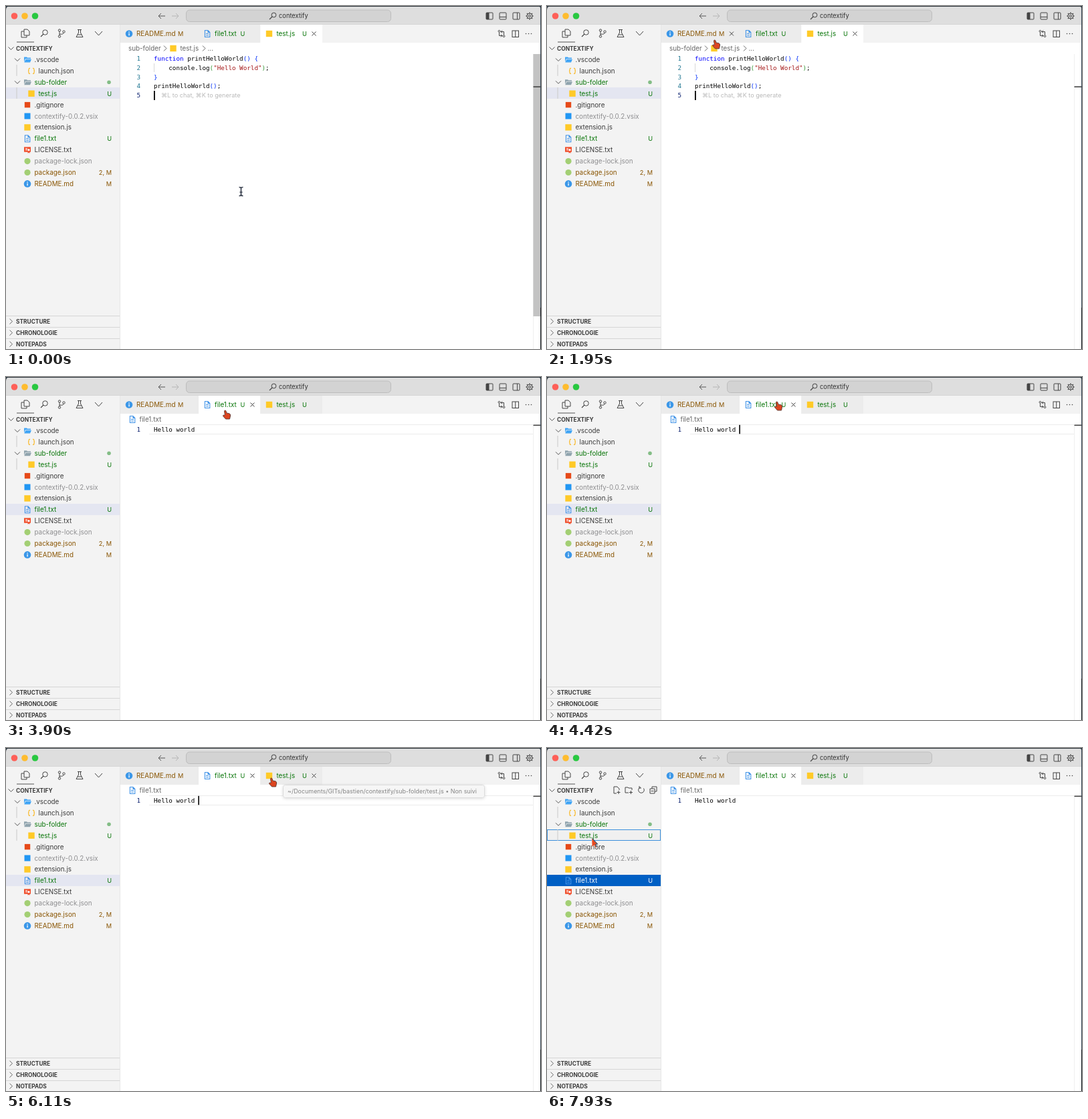
Write an HTML page that moves like this. It is 800x514 px and loops after 8 s.

```html
<!DOCTYPE html>
<html lang="fr">
<head>
<meta charset="utf-8">
<title>contextify</title>
<style>
html, body { margin: 0; width: 100%; height: 100%; overflow: hidden; background: #fff; }
svg { display: block; width: 800px; height: 514px; }
text { white-space: pre; font-family: Inter, "Liberation Sans", "DejaVu Sans", sans-serif; }
.mono { font-family: "DejaVu Sans Mono", "Liberation Mono", monospace; }
</style>
</head>
<body>
<svg viewBox="0 0 800 514">
  <defs>
    <linearGradient id="menuFill" gradientUnits="userSpaceOnUse" x1="0" y1="484" x2="0" y2="514">
      <stop stop-color="#dddddd"/><stop offset=".5" stop-color="#d9dfe1"/><stop offset="1" stop-color="#c5dde6"/>
    </linearGradient>
    <filter id="shadow" x="-10%" y="-20%" width="120%" height="150%">
      <feDropShadow dx="0" dy="2" stdDeviation="3" flood-opacity=".28"/>
    </filter>
    <filter id="softShadow" x="-5%" y="-40%" width="110%" height="200%">
      <feDropShadow dx="0" dy="1" stdDeviation="2" flood-opacity=".14"/>
    </filter>
  </defs>
  <g id="base"></g>
  <g id="live"></g>
  <g id="pointer"></g>
</svg>
<script>
const LOOP = 8000, ROW = 16.9, LINE = 13.85;
const GREEN = '#087508', BROWN = '#895503', GRAY = '#8e8e90', INK = '#3b3b3b';

// Drawing helpers; text is placed by its vertical middle.
const text = (x, y, s, fill = INK, size = 9.85, extra = '') =>
  `<text x="${x}" y="${y + size * .36}" fill="${fill}" font-size="${size}" ${extra}>${s}</text>`;
const rect = (x, y, w, h, fill, extra = '') =>
  `<rect x="${x}" y="${y}" width="${w}" height="${h}" fill="${fill}" ${extra}/>`;
const circle = (x, y, r, fill, extra = '') =>
  `<circle cx="${x}" cy="${y}" r="${r}" fill="${fill}" ${extra}/>`;
const stroke = (x, y, d, color = '#444', width = 1) =>
  `<path transform="translate(${x} ${y})" d="${d}" fill="none" stroke="${color}" stroke-width="${width}"/>`;
const shape = (x, y, d, fill, extra = '') =>
  `<path transform="translate(${x} ${y})" d="${d}" fill="${fill}" ${extra}/>`;
const chevron = (x, y, color = '#666', width = 1) => stroke(x, y, 'M-2 -4L2 0L-2 4', color, width);
const chevronDown = (x, y) => stroke(x, y, 'M-4 -2L0 2L4 -2', '#555');
const cross = (x, y) => stroke(x, y, 'M-3 -3L3 3M3 -3L-3 3');
const search = (x, y, k = 1) => stroke(x, y, 'M-1 1L-5 5', '#444', 1.1) +
  circle(x + 1.5, y - 1.5, 3.4 * k, 'none', 'stroke="#444"');

const folder = color => (x, y) =>
  shape(x, y, 'M-5 -4H-1L0 -3H5V-1.5H-3L-5 3Z M-2.5 -.7H6L4 4H-4.8Z', color);
const icons = {
  code: folder('#42a5f5'),
  dir: folder('#90a4ae'),
  json: (x, y) => stroke(x, y, 'M-2 -4H-3Q-4 -4 -4 -2Q-4 0 -5 0Q-4 0 -4 2Q-4 4 -3 4H-2M2 -4H3Q4 -4 4 -2Q4 0 5 0Q4 0 4 2Q4 4 3 4H2', '#f9b825', 1.2),
  js: (x, y) => rect(x - 4.7, y - 4.7, 9.4, 9.4, '#ffca28'),
  git: (x, y) => rect(x - 4.2, y - 4.2, 8.4, 8.4, '#e64a19'),
  vsix: (x, y) => rect(x - 4.5, y - 4.5, 9, 9, '#2196f3'),
  node: (x, y) => circle(x, y, 4.6, '#a3cf74'),
  txt: (x, y) => stroke(x, y, 'M-3.6 -5H1L3.8 -2V5H-3.6ZM1 -5V-2H3.8M-2 0H2M-2 2.5H2', '#4294e8', 1.1),
  license: (x, y) => shape(x, y, 'M-5 -4.5H5V3H3.5V5L2 4L.5 5V3H-5Z', '#f0502e') +
    stroke(x, y, 'M-3 -2H0M-3 0H0', '#fff') + circle(x + 2, y, 1.6, '#fff'),
  info: (x, y) => circle(x, y, 5.3, '#3b97e8') + rect(x - .6, y - .8, 1.3, 3.7, '#fff') + circle(x, y - 2.4, .8, '#fff')
};

const files = [
  ['code', '.vscode', INK, '', 0, true],
  ['json', 'launch.json', INK, '', 1],
  ['dir', 'sub-folder', GREEN, '', 0, true],
  ['js', 'test.js', GREEN, 'U', 1],
  ['git', '.gitignore', INK, ''],
  ['vsix', 'contextify-0.0.2.vsix', GRAY, ''],
  ['js', 'extension.js', INK, ''],
  ['txt', 'file1.txt', GREEN, 'U'],
  ['license', 'LICENSE.txt', INK, ''],
  ['node', 'package-lock.json', GRAY, ''],
  ['node', 'package.json', BROWN, '2, M'],
  ['info', 'README.md', BROWN, 'M']
];
const rowY = i => 80.5 + ROW * i;
const TEST = 3, FILE1 = 7;

function titleBar() {
  const panel = (x, part) => rect(x - 5, 10, 10, 10, 'none', 'stroke="#444" rx="1"') + part;
  const gear = stroke(783, 15, 'M0 -5.6V5.6M-5.6 0H5.6M-4 -4L4 4M4 -4L-4 4', '#555', 1.6);
  return rect(0, 0, 800, 28, '#dedede') + rect(0, 27.5, 800, .7, '#d0d0d0') +
    circle(12.5, 15, 4.8, '#fe5f57') + circle(28, 15, 4.8, '#febc2e') + circle(43.5, 15, 4.8, '#28c840') +
    stroke(233, 15, 'M5 0H-4.5M-1 -4L-5 0L-1 4', '#555') + stroke(253, 15, 'M-5 0H4.5M1 -4L5 0L1 4', '#b5b5b5') +
    rect(269.5, 6, 306, 17.5, '#d3d3d3', 'rx="5" stroke="#bdbdbd"') +
    search(399, 15) + text(408, 15, 'contextify', '#333', 9.3) +
    panel(723, rect(718, 10, 4.5, 10, '#444')) + panel(743, rect(738, 16, 10, 1, '#444')) +
    panel(763, rect(764, 10, 1, 10, '#444')) +
    gear + circle(783, 15, 4, '#dedede', 'stroke="#444"') + circle(783, 15, 1.6, 'none', 'stroke="#444"');
}

function sideBar() {
  let s = rect(0, 28, 170.5, 486, '#f3f3f3') + rect(170, 28, 1, 486, '#e7e7e7');
  s += stroke(29, 41, 'M-2 -6H3L6 -3V3H-2ZM-2 -3H-6V6H2V3') + search(57, 41, 1.1) +
    stroke(83, 41, 'M-3 -3V3M-3 1Q3 2 3 -1') + circle(80, 36.5, 1.7, 'none', 'stroke="#444"') +
    circle(80, 45.5, 1.7, 'none', 'stroke="#444"') + circle(86.5, 38.5, 1.7, 'none', 'stroke="#444"') +
    stroke(110, 41, 'M-3 -5.5H3M-1.5 -5.5V-1L-5 5.5H5L1.5 -1V-5.5M-3 2H3') +
    stroke(138.5, 41, 'M-5.5 -3L0 3L5.5 -3') + rect(16, 53.5, 26, 1, '#555');
  s += chevronDown(7.5, 63.5) + text(15, 63.5, 'CONTEXTIFY', INK, 8.4, 'font-weight="700"');
  ['STRUCTURE', 'CHRONOLOGIE', 'NOTEPADS'].forEach((name, i) => {
    const y = 472.7 + 17 * i;
    s += rect(0, Math.floor(y - 8.7), 170, 1, '#d6d6d6') + chevron(7.5, y) + text(15, y, name, INK, 8.4, 'font-weight="700"');
  });
  return s;
}

function tree(st) {
  let s = '';
  files.forEach(([icon, name, color, badge, depth = 0, open], i) => {
    const y = rowY(i), top = Math.floor(y - ROW / 2);
    const selected = i === (st.active === 'test' ? TEST : FILE1);
    const strong = selected && st.treeFocus;
    if (selected) s += rect(0, top, 170, 17, strong ? '#005fc4' : '#e4e6f1');
    if ((i === FILE1 && st.menu) || (i === TEST && st.treeFocus))
      s += rect(.5, top + .5, 169, 16, i === TEST ? '#f0f0f0' : 'none', 'stroke="#3b8fdc"');
    if (depth) s += rect(15.5, top, 1, ROW, '#c9c9c9');
    if (open) s += chevronDown(17, y);
    const ink = strong ? '#fff' : color;
    s += icons[icon](32 + depth * 6, y) + text(42.5 + depth * 6, y, name, ink) +
      text(158, y, badge, ink, 9.2, 'text-anchor="end"');
  });
  s += circle(154, rowY(2), 2.8, '#83bd86');
  if (st.sideHover) {
    s += stroke(104, 63, 'M0 5H-4V-5H1L4 -2V0M3 1V6M.5 3.5H5.5') +
      stroke(122, 63, 'M0 4H-5V-4H-1L0 -3H5V0M3.5 1V6M1 3.5H6') +
      stroke(141, 63, 'M3.5 -2.5A4.3 4.3 0 1 1 -1 -4.2M-3 -6V-3H0') +
      stroke(159, 63, 'M-2 -2V-5H5V2H2M-5 -2H2V5H-5ZM-3.5 1.5H.5');
  }
  return s;
}

function tabs(st) {
  const tab = (id, x, w, icon, name, color, mark, markX, closeX) => {
    const active = st.active === id;
    return rect(x, 28, w, 27, active ? '#fff' : '#ececec') +
      icons[icon](x + 13, 41.5) + text(x + 24, 41.5, name, color) +
      text(markX, 41.5, mark, color, 9.2) + (active || st.hover === id ? cross(closeX, 41.5) : '');
  };
  return rect(171, 28, 629, 27, '#f3f3f3') +
    tab('readme', 171, 117, 'info', 'README.md', BROWN, 'M', 257, 276) +
    tab('file1', 288, 92, 'txt', 'file1.txt', GREEN, 'U', 350.5, 368.5) +
    tab('test', 380.5, 92.5, 'js', 'test.js', GREEN, 'U', 443, 460.5) +
    stroke(741, 41.5, 'M-3.5 -2V3H1M-1 1L1 3L-1 5M3.5 2V-3H-1M1 -5L-1 -3L1 -1') +
    circle(737.5, 37.8, 1.4, 'none', 'stroke="#444"') + circle(744.5, 45.2, 1.4, 'none', 'stroke="#444"') +
    rect(757, 37, 9.5, 9.5, 'none', 'stroke="#444"') + rect(761.2, 37, 1, 9.5, '#444') +
    [777.5, 781.5, 785.5].map(x => circle(x, 41.5, .8, '#444')).join('');
}

const tint = (s, color) => `<tspan fill="${color}">${s}</tspan>`;
const blue = s => tint(s, '#0431fa');
const code = [
  tint('function', '#0000ff') + ' printHelloWorld' + blue('()') + ' ' + blue('{'),
  '    console.log' + tint('(', '#319331') + tint('"Hello World"', '#a31515') + tint(')', '#319331') + ';',
  blue('}'),
  'printHelloWorld' + blue('()') + ';',
  ''
];

function editor(st) {
  const isTest = st.active === 'test';
  const lines = isTest ? code : ['Hello world'];
  let s = rect(171, 55, 629, 459, '#fff');
  s += isTest
    ? text(183, 63.5, 'sub-folder', '#666') + chevron(238, 63.5) + icons.js(250, 63.5) +
      text(260.5, 63.5, 'test.js', '#666') + chevron(296, 63.5) + text(301.5, 63.5, '...', '#666')
    : icons.txt(189, 63.5) + text(199.5, 63.5, 'file1.txt', '#666') + rect(214, 71, 574, 1, '#ececec');
  if (!isTest && st.focus) s += rect(214, 85, 574, 1, '#ececec');
  lines.forEach((line, i) => {
    const y = 78.5 + LINE * i, last = i === lines.length - 1;
    s += text(201, y, i + 1, last ? '#0b216f' : '#237893', 9.25, 'class="mono" text-anchor="end"') +
      text(221, y, line, '#000', 9.25, 'class="mono"');
  });
  if (isTest) s += rect(221, 86, 1, 13, '#d8d8d8') + text(232, 134, '⌘L to chat, ⌘K to generate', '#b9b9b9', 9.1);
  if (st.caret) s += isTest ? rect(221, 127, 1.8, 14, '#000') : rect(287.3, 71.8, 1.6, 13.5, '#000');
  s += rect(788, 72, 1, 442, '#efefef') + rect(788.5, 72, 11, 393, '#9e9e9e', `opacity="${st.thumb}"`) +
    rect(788.5, isTest ? 120.3 : 71.5, 11.5, 1.6, '#444');
  return s;
}

// "|" precedes a shortcut, ">" ends a submenu entry, "~" starts a disabled one.
const menuGroups = [
  ['Add to Context', 'Reset Context'],
  ['Fermer|⌘ W', 'Fermer les autres|⌥⌘ T', 'Fermer à droite', 'Fermer la version sauvegardée [⌘R U]', 'Tout fermer [⌘R W]'],
  ['Copier le chemin|⌥⌘ C', 'Copier le chemin d’accès relatif|⌥⇧⌘ C', 'Copy Remote File URL', 'Copy Remote File URL From...'],
  ['Rouvrir l’éditeur avec...'],
  ['Partager>'],
  ['Open Changes>', 'Open on Remote (Web)>'],
  ['File History>'],
  ['Afficher dans le Tildor|⌥⌘ R', 'Afficher en mode Explorateur'],
  ['~Garder ouvert [⌘R ⏎]', 'Épingler [⌘R ⇧⏎]'],
  ['Filter Line By...'],
  ['Fractionner en haut [⌘R ⌃⇧⌥⌘:]', 'Fractionner en bas']
];
const notepad = (x, y) => rect(x - 5, y - 5, 10, 10, '#f5f0dc', 'stroke="#77715f" stroke-width=".8"') +
  rect(x - 5, y - 5, 10, 2, '#8a8577') + stroke(x, y, 'M-3 0H3M-3 2.5H3', '#c9bf9d', .7);

function menu({ x, y, lit }) {
  let s = rect(x, y - 13.5, 270, 560, 'url(#menuFill)', 'rx="5" stroke="#bcbcbc" stroke-width=".7" filter="url(#shadow)"');
  if (lit) s += rect(x + 5, y - 8.3, 260, 16.9, '#4a9cf6', 'rx="3"');
  s += shape(x + 91, y, 'M-4 -5H1.5L4 -2.5V5H-4Z', '#f4f4f4', 'stroke="#888" stroke-width=".7"') +
    stroke(x + 106, y, 'M0 -4.5V4.5M-4.5 0H4.5', '#333', 2.6) + notepad(x + 120.5, y) +
    stroke(x + 87, y + ROW, 'M5.5 -5L-1 1', '#8b5a2b', 1.5) +
    shape(x + 87, y + ROW, 'M-2 -1L1.5 2.5L-2 5L-5.5 3Z', '#d9b33c') + notepad(x + 101.5, y + ROW);
  let row = y;
  menuGroups.forEach((group, g) => {
    if (g) {
      s += rect(x + 11, row - 4.7, 248, .8, '#bfbfbf');
      row += 8.45;
    }
    group.forEach((item, i) => {
      const [label, keys = ''] = item.split('|');
      const ink = label[0] === '~' ? '#a3a3a3' : lit && !g && !i ? '#fff' : '#222';
      s += text(x + 11, row, label.replace(/[~>]/g, ''), ink) +
        text(x + 259, row, keys, '#999', 9.85, 'text-anchor="end"');
      if (label.endsWith('>')) s += chevron(x + 255, row, '#222', 1.4);
      row += ROW;
    });
  });
  return s;
}

const tooltip = () => rect(414.5, 55.5, 301, 19, '#f6f6f6', 'rx="3" stroke="#dcdcdc" filter="url(#softShadow)"') +
  text(421, 65, '~/Documents/GITs/bastien/contextify/sub-folder/test.js • Non suivi', '#858585', 8.95);

// Pointer path: time, x, y of the tip.
const path = [
  [0, 351, 278], [1040, 351, 278], [1820, 249, 51], [2080, 249, 51], [2470, 313, 43], [3380, 313, 43],
  [3770, 326, 50], [3900, 326, 50], [4290, 342, 37], [4940, 342, 37], [5200, 355, 43], [5590, 355, 43],
  [5980, 395, 45], [6500, 395, 45], [7280, 67, 135], [LOOP, 67, 135]
];
function pointerAt(t) {
  const i = path.findIndex(p => p[0] > t);
  const [a, b] = [path[i - 1], path[i]];
  const k = (t - a[0]) / (b[0] - a[0]), e = k * k * (3 - 2 * k);
  return [a[1] + (b[1] - a[1]) * e, a[2] + (b[2] - a[2]) * e];
}
const within = (t, a, b) => t >= a && t < b;

function pointer(t, x, y, menuOpen) {
  let s = '';
  if (within(t, 2470, 2600) || within(t, 2990, 3250) || within(t, 4940, 5070) || within(t, 5400, 5590))
    s += circle(x - .5, y + 2, 17.5, '#fff', 'fill-opacity=".15" stroke="#c9d6e6" stroke-opacity=".7" stroke-width="4"') +
      circle(x - .5, y + 2, 18.2, 'none', 'stroke="#5592d8" stroke-width="2"');
  if (!menuOpen && x > 171 && y > 72)
    return s + stroke(x + .5, y, 'M-3 -6.5Q0 -6.5 0 -4.5Q0 -6.5 3 -6.5M0 -5V5M-3 6.5Q0 6.5 0 4.5Q0 6.5 3 6.5M-2 1H2', '#3b4250', 1.7);
  if (!menuOpen && x > 171)
    return s + shape(x, y, 'M.5 .8Q1.6 -.8 2.8 .6L4 4L8 4.8Q10 5.5 9.6 8L8.5 13H2.5L-1.5 8.5Q-2 6.5 1.4 7.2Z', '#dc4520', 'stroke="#5a3a35" stroke-width=".9"');
  return s + shape(x, y, 'M0 0L8.5 9L5.3 9.6L7.2 13.8L5.4 14.6L3.5 10.8L.3 13Z', '#e8491f', 'stroke="#fff" stroke-width=".4"') +
    stroke(x, y, 'M.5 .3L8.5 9L5.3 9.6L7.2 13.8', '#34516b', 1.1);
}

function stateAt(t, x, y) {
  const open = within(t, 2990, 3900) ? { x: 312, y: 53, lit: t >= 3640 }
    : within(t, 4940, 5590) ? { x: 342, y: 46.5, lit: t >= 5200 } : null;
  const overTabs = !open && y < 55 && x > 171;
  const treeFocus = t >= 7800, focus = !open && !treeFocus;
  return {
    active: t < 2470 ? 'test' : 'file1',
    hover: overTabs ? (x < 288 ? 'readme' : x < 380 ? 'file1' : x < 473 ? 'test' : '') : '',
    menu: open,
    tip: within(t, 5980, 6560),
    treeFocus,
    focus,
    sideHover: x < 170,
    caret: focus && (t + 80) % 1000 < 520,
    thumb: (.62 * Math.max(0, Math.min(1, (1800 - t) / 400))).toFixed(2)
  };
}

const [base, live, cursor] = ['base', 'live', 'pointer'].map(id => document.getElementById(id));
base.innerHTML = titleBar() + sideBar();
const edge = rect(799, 0, 1, 452, '#33414f') + rect(799, 452, 1, 62, '#0a0f14') + rect(0, 0, 800, 1, '#2b3238') +
  shape(0, 0, 'M0 0H6Q0 0 0 6Z', '#26323d') + shape(800, 0, 'M0 0H-6Q0 0 0 6Z', '#26323d');

let shown = '';
function frame(now) {
  const t = now % LOOP, [x, y] = pointerAt(t), st = stateAt(t, x, y);
  const key = JSON.stringify(st);
  if (key !== shown) {
    live.innerHTML = tree(st) + editor(st) + tabs(st) + edge + (st.menu ? menu(st.menu) : '') + (st.tip ? tooltip() : '');
    shown = key;
  }
  cursor.innerHTML = pointer(t, x, y, st.menu);
  requestAnimationFrame(frame);
}
frame(0);
</script>
</body>
</html>
```
